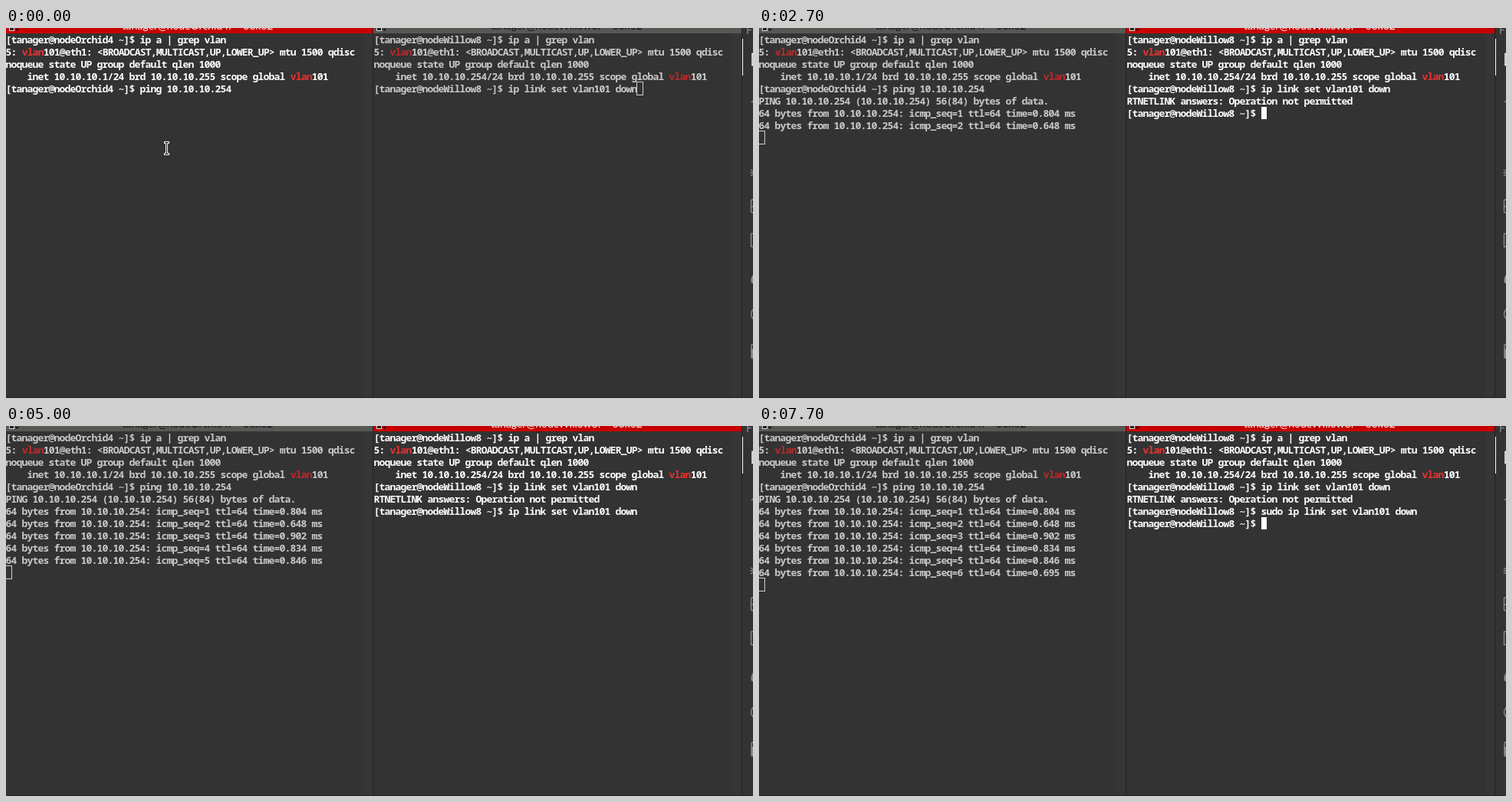
These frames come from a looping animation (974x483 px, 8 s). An HTML page:

```html
<!DOCTYPE html>
<html lang="en">
<head>
<meta charset="utf-8">
<title>Two terminals</title>
<style>
html, body { margin: 0; width: 100%; height: 100%; overflow: hidden; background: #333; }
#stage { position: relative; width: 974px; height: 483px; overflow: hidden; background: #333; }
.pane { position: absolute; top: 0; height: 482px; overflow: hidden; color: #c9c9c9; --red: #bd2a2a; --bar: #565854; --title: #111; }
.pane.active { color: #fff; --red: #ea3232; --bar: #c80000; --title: #fff; }
#left { left: 0; width: 478px; }
#right { left: 479px; width: 480px; }
.bar { position: absolute; left: 0; top: 0; width: 100%; height: 7px; background: var(--bar); overflow: hidden; }
.title { position: absolute; left: 11px; top: -13px; width: 100%; text-align: center; white-space: pre;
  font: 14px/20px Lato, "Noto Sans", sans-serif; color: var(--title); }
#right .title { left: 12px; }
.icon { position: absolute; left: 3px; top: 0; }
.scroll { position: absolute; right: 0; top: 7px; bottom: 0; width: 12px; background: #383538; }
.text { position: absolute; top: 7px; margin: 0; white-space: pre; letter-spacing: calc(7px - .6em);
  font: 600 13px/16px "Noto Sans Mono", "DejaVu Sans Mono", monospace; }
#left pre { left: -.4px; }
#right pre { left: .6px; }
.text b { font-weight: inherit; color: var(--red); }
.cursor { width: 7px; height: 16px; text-indent: -.4px; color: #222; background: #fff; }
.cursor.hollow { box-sizing: border-box; width: 9px; height: 18px; margin: -1px; background: none; border: 1px solid #d0d0d0; }
.line { position: absolute; background: #232323; }
svg { position: absolute; overflow: hidden; }
#pointer { width: 7px; height: 18px; }
</style>
</head>
<body>
<div id="stage">
  <div id="left" class="pane"></div>
  <div id="right" class="pane"></div>
  <div class="line" style="left:478px;top:0;width:1px;height:483px"></div>
  <div class="line" style="left:959px;top:0;width:1px;height:483px"></div>
  <div class="line" style="left:0;top:482px;width:974px;height:1px"></div>
  <svg style="left:960px;top:0" width="14" height="483" fill="none" stroke="#8c8c8c" stroke-width="1.4">
    <text x="5" y="8" fill="#999" stroke="none" font-family="Open Sans, sans-serif" font-size="14">F</text>
    <path d="M.5 14V62" stroke="#fff" stroke-width="1"/>
    <path d="M15 33.5H13V48.5H15" stroke="#fff" stroke-width="1.5"/>
    <path d="M12 97L14 95"/>
    <path d="M11 185l3 2M10.5 189H14M11 193l3-2"/>
    <rect x="11.5" y="224" width="14" height="17" rx="2"/>
    <path d="M12 233H14"/>
    <rect x="11.5" y="268.5" width="14" height="17"/>
    <path d="M14 323Q11 328 12.5 332L14 333Z" fill="#8c8c8c"/>
    <circle cx="19.5" cy="373.5" r="8"/>
    <rect x="12" y="413" width="14" height="18" rx="1"/>
    <path d="M13 419V430" stroke-width="2"/>
  </svg>
  <svg id="pointer" viewBox="0 0 7 18">
    <path d="M0 0H7V3H5V15H7V18H0V15H2V3H0Z" fill="#fff"/>
    <path d="M1 1.5H6M1 16.5H6M3.5 1V17" stroke="#111" fill="none"/>
  </svg>
</div>
<script>
const LOOP = 8000;
const el = id => document.getElementById(id);
const prompt = host => `[tanager@${host} ~]$ `;
const hosts = { left: "nodeOrchid4", right: "nodeWillow8" };
const down = "ip link set vlan101 down";
const delays = [".804", ".648", ".902", ".834", ".846", ".695"];

const intro = (host, ip) => [
  prompt(host) + "ip a | grep vlan",
  "5: {vlan}101@eth1: <BROADCAST,MULTICAST,UP,LOWER_UP> mtu 1500 qdisc",
  "noqueue state UP group default qlen 1000",
  `    inet ${ip}/24 brd 10.10.10.255 scope global {vlan}101`
];

// Each step changes only the listed parts of the state.
const steps = [
  [0, { focus: "left", lit: false, pings: 0, ran: 0, typed: down, caret: 24, mouse: [206, 148] }],
  [200, { lit: true }],
  [700, { mouse: null }],
  [1000, { pings: 1 }],
  [1300, { lit: false }],
  [1500, { mouse: [205, 148] }],
  [1600, { mouse: [831, 259] }],
  [1800, { focus: "right", lit: true }],
  [2000, { pings: 2 }],
  [2400, { lit: false }],
  [2700, { lit: true, ran: 1, typed: "", caret: 0, mouse: null }],
  [2800, { pings: 3 }],
  [3300, { lit: false }],
  [3800, { lit: true }],
  [3900, { pings: 4 }],
  [4000, { typed: down, caret: 24 }],
  [4400, { caret: 0 }],
  [4800, { pings: 5 }],
  [5000, { lit: false }],
  [5500, { lit: true }],
  [5700, { typed: "su" + down, caret: 2 }],
  [5800, { typed: "sud" + down, caret: 3 }],
  [5900, { typed: "sudo" + down, caret: 4, pings: 6 }],
  [6000, { typed: "sudo " + down, caret: 5 }],
  [6500, { ran: 2, typed: "", caret: 0 }],
  [7500, { lit: false }],
  [7700, { lit: true }]
];

function leftView({ pings }) {
  const lines = [...intro(hosts.left, "10.10.10.1"), prompt(hosts.left) + "ping 10.10.10.254"];
  if (!pings) return { lines, row: 4, col: lines[4].length };
  lines.push("PING 10.10.10.254 (10.10.10.254) 56(84) bytes of data.");
  for (let i = 0; i < pings; i++)
    lines.push(`64 bytes from 10.10.10.254: icmp_seq=${i + 1} ttl=64 time=0${delays[i]} ms`);
  return { lines, row: lines.length, col: 0 };
}

function rightView({ ran, typed, caret }) {
  const ps = prompt(hosts.right);
  const lines = intro(hosts.right, "10.10.10.254");
  if (ran > 0) lines.push(ps + down, "RTNETLINK answers: Operation not permitted");
  if (ran > 1) lines.push(ps + "sudo " + down);
  lines.push(ps + typed);
  return { lines, row: lines.length - 1, col: ps.length + caret };
}

function buildPane(id) {
  el(id).innerHTML = `<div class="bar"><div class="title">tanager@${hosts[id]}: ~ 66x62</div>
    <svg class="icon" width="15" height="6"><rect x="1.5" y="-3.5" width="6" height="7" fill="#222" stroke="#ddd"/>
    <path d="M9 1H14L11.5 4Z" fill="#111"/></svg></div>
    <div class="scroll"></div><pre class="text"></pre><div class="text cursor"></div>`;
}

const markup = lines => lines.join("\n")
  .replace(/&/g, "&amp;").replace(/</g, "&lt;").replace(/>/g, "&gt;")
  .replace(/\{(.*?)\}/g, "<b>$1</b>");

function drawPane(id, view, state) {
  const pane = el(id), active = state.focus === id;
  pane.classList.toggle("active", active);
  pane.querySelector("pre").innerHTML = markup(view.lines);
  const cur = pane.querySelector(".cursor");
  cur.classList.toggle("hollow", !active);
  cur.style.left = view.col * 7 + (id === "right" ? 1 : 0) + "px";
  cur.style.top = 7 + view.row * 16 + "px";
  cur.style.visibility = !active || state.lit ? "visible" : "hidden";
  cur.textContent = active ? (view.lines[view.row] || "")[view.col] || "" : "";
}

function draw(count) {
  const state = Object.assign({}, ...steps.slice(0, count).map(s => s[1]));
  drawPane("left", leftView(state), state);
  drawPane("right", rightView(state), state);
  const p = el("pointer").style;
  p.display = state.mouse ? "block" : "none";
  if (state.mouse) [p.left, p.top] = state.mouse.map(v => v + "px");
}

let shown = 0;
const start = performance.now();
function tick() {
  const t = (performance.now() - start) % LOOP;
  const count = steps.filter(s => s[0] <= t).length;
  if (count !== shown) draw(shown = count);
  requestAnimationFrame(tick);
}

buildPane("left");
buildPane("right");
tick();
</script>
</body>
</html>
```
